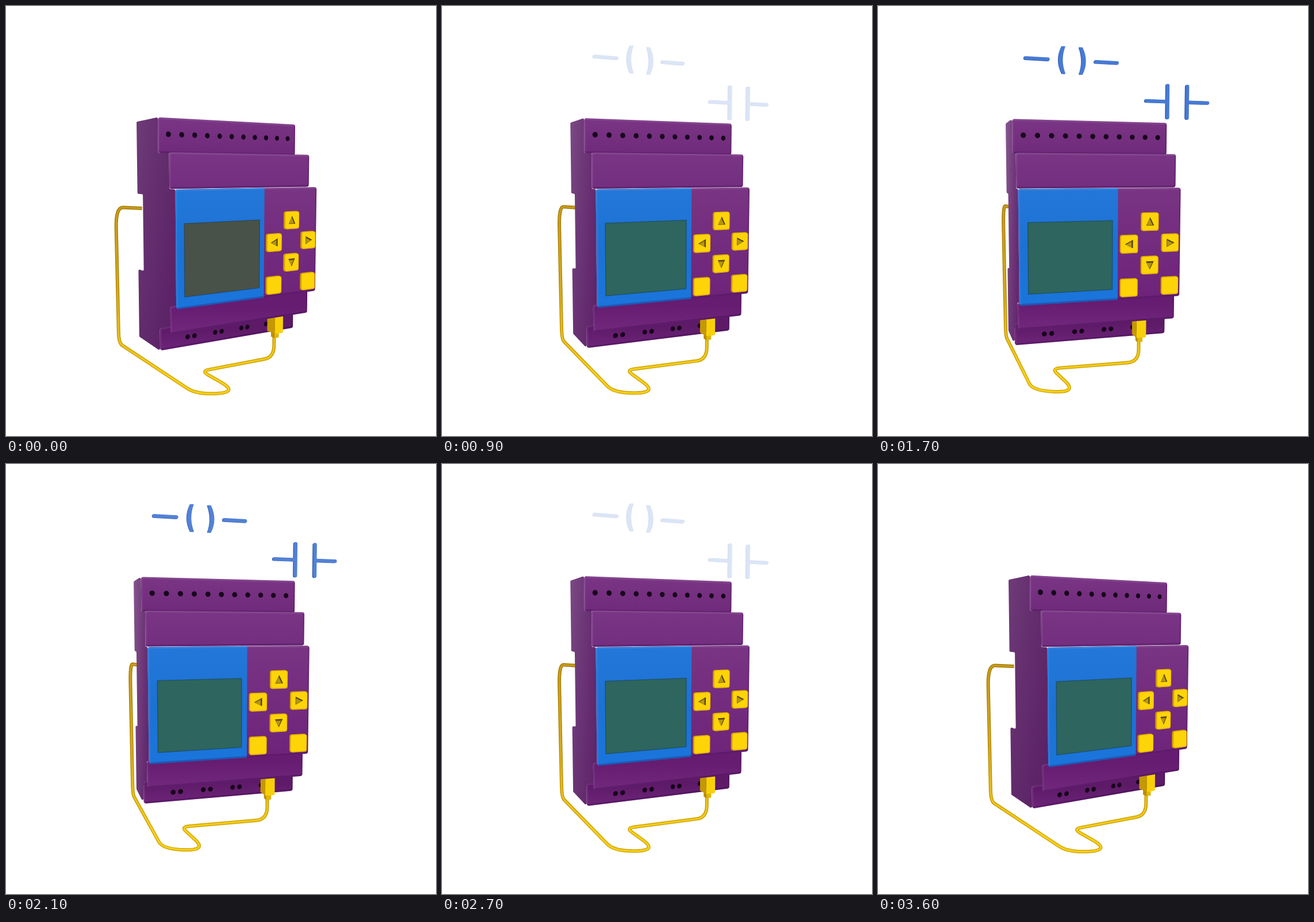
Recreate the animation shown at these times as an HTML page with a canvas. Size 748 px wide and 748 px high, loop 3700 ms.

```html
<!DOCTYPE html>
<html lang="en">
<head>
<meta charset="utf-8">
<title>Controller</title>
<style>
html, body { margin: 0; width: 100%; height: 100%; overflow: hidden; background: #fff; }
canvas { display: block; }
</style>
</head>
<body>
<canvas id="stage" width="748" height="748"></canvas>
<script>
const g = document.getElementById('stage').getContext('2d');
const LOOP = 3700, HALF = 1800, STEP = 100;

// camera: focal length in px, looking slightly down; pivot of the device
const FOCAL = 972, CENTER = 374, PIVOT_X = -6.2, PIVOT_Z = 1126.3;
const TILT_COS = Math.cos(0.0874), TILT_SIN = Math.sin(0.0874);
const TURN_FROM = 30, TURN_BY = -14.8; // degrees

// device space: x along the front, y down, z towards the viewer
const LEFT = -164.8, RIGHT = 131.2, BACK = -19, FRONT = 148.5, SPLIT = 11.5;
const TIERS = {
  top: { z: 80, y0: -94, y1: -33, from: '#7a3685', to: '#702a7b' },
  upper: { z: 125, y0: -33, y1: 28.3, from: '#7a3685', to: '#732e7f' },
  main: { z: FRONT, y0: 28.3, y1: 228.3, from: '#793483', to: '#6d2279' },
  lower: { z: 125, y0: 228.3, y1: 276.5, from: '#661c71', to: '#71287d' },
  base: { z: 80, y0: 276.5, y1: 318, from: '#5d1a67', to: '#6e2479' }
};
// corners of the cable: x, y, z, rounding
const CABLE = [
  [-156, 69, -19, 0], [-156, 75, -168, 45], [-154, 373, -168, 22], [-150, 362, 194, 36],
  [-77, 369, 203, 38], [-104, 353, 123, 16], [70, 364, 100, 24], [70, 316, 100, 0]
];

let cos = 1, sin = 0, turn = 0;

function aim(u) {
  turn = u;
  const a = (TURN_FROM + TURN_BY * u) * Math.PI / 180;
  cos = Math.cos(a);
  sin = Math.sin(a);
}

function project([x, y, z]) {
  const depth = PIVOT_Z + x * sin - z * cos;
  const u = (PIVOT_X + x * cos + z * sin) / depth, v = y / depth;
  const w = TILT_COS + v * TILT_SIN;
  return [CENTER + FOCAL * u / w, CENTER + FOCAL * (v * TILT_COS - TILT_SIN) / w];
}

const rect = (x0, y0, x1, y1, z) => [[x0, y0, z], [x1, y0, z], [x1, y1, z], [x0, y1, z]];
const smooth = u => { u = Math.min(1, Math.max(0, u)); return u * u * (3 - 2 * u); };
const mix = (c, d, u) => `rgb(${c.map((v, i) => Math.round(v + (d[i] - v) * u))})`;

function ramp(x0, y0, x1, y1, ...colors) {
  const r = g.createLinearGradient(x0, y0, x1, y1);
  colors.forEach((c, i) => r.addColorStop(i / (colors.length - 1), c));
  return r;
}

function path(pts, r = 0) {
  const p = pts.map(project), n = p.length, a = p[n - 1], b = p[0];
  g.beginPath();
  g.moveTo((a[0] + b[0]) / 2, (a[1] + b[1]) / 2);
  p.forEach((q, i) => g.arcTo(...q, ...p[(i + 1) % n], r));
  g.closePath();
}

function fill(pts, color, r) {
  path(pts, r);
  g.fillStyle = color;
  g.fill();
}

function line(pts, color, width, cap = 'butt') {
  g.beginPath();
  pts.forEach(p => g.lineTo(...project(p)));
  g.strokeStyle = color;
  g.lineWidth = width;
  g.lineCap = cap;
  g.stroke();
}

function hole(x, y, z, r) {
  const ring = Array.from({ length: 16 }, (_, i) =>
    [x + r * Math.cos(i * Math.PI / 8), y + r * Math.sin(i * Math.PI / 8), z]);
  fill(ring, '#17051b');
}

function side() {
  const steps = Object.values(TIERS).flatMap(t => [[t.z, t.y0], [t.z, t.y1]]);
  const back = [[BACK, 318], [BACK, 185.5], [8, 185.5], [8, 41], [BACK, 41], [BACK, -94]];
  const pts = [...steps, ...back].map(([z, y]) => [LEFT, y, z]);
  const x0 = project([LEFT, 0, BACK])[0], x1 = project([LEFT, 0, FRONT])[0];
  const near = mix([110, 58, 119], [134, 86, 143], turn);
  const far = mix([97, 42, 107], [106, 48, 116], turn);
  fill(pts, ramp(x0, 0, x1, 0, near, far), 2);
  fill(pts, ramp(0, 200, 0, 590, 'rgba(70,10,85,0)', 'rgba(70,10,85,.3)'), 2);
}

// front of one tier with bevelled edges
function face({ z, y0, y1, from, to }, inside) {
  const p = rect(LEFT, y0, RIGHT, y1, z);
  const top = project(p[0])[1], bottom = project(p[3])[1];
  g.save();
  path(p, 4);
  g.fillStyle = ramp(0, top, 0, bottom, from, to);
  g.fill();
  g.clip();
  if (inside) inside(top, bottom);
  line([p[1], p[2]], 'rgba(40,0,50,.2)', 4);
  line([p[3], p[2]], 'rgba(40,0,60,.25)', 6);
  line([p[3], p[0]], 'rgba(255,255,255,.06)', 6);
  line([p[0], p[1]], 'rgba(255,255,255,.08)', 6);
  g.restore();
}

function cable() {
  const towards = (a, b, d) => {
    const len = Math.hypot(b[0] - a[0], b[1] - a[1], b[2] - a[2]);
    return [0, 1, 2].map(i => a[i] + (b[i] - a[i]) * d / len);
  };
  const last = CABLE.length - 1;
  g.beginPath();
  g.moveTo(...project(CABLE[0]));
  for (let i = 1; i < last; i++) {
    const c = CABLE[i], r = c[3];
    g.lineTo(...project(towards(c, CABLE[i - 1], r)));
    g.quadraticCurveTo(...project(c), ...project(towards(c, CABLE[i + 1], r)));
  }
  g.lineTo(...project(CABLE[last]));
  g.lineCap = 'butt';
  g.lineJoin = 'round';
  g.lineWidth = 6;
  g.strokeStyle = ramp(0, 350, 0, 640, '#a67c0a', '#b38a0e', '#d3a608');
  g.stroke();
  g.lineWidth = 3;
  g.strokeStyle = ramp(0, 350, 0, 640, '#c99d18', '#d6ab1c', '#f8d218');
  g.stroke();
}

function block(x0, x1, y0, y1, z0, z1, front, flank) {
  fill([[x0, y0, z0], [x0, y0, z1], [x0, y1, z1], [x0, y1, z0]], flank);
  fill(rect(x0, y0, x1, y1, z1), front, 1);
}

function button(x, y, quarter) {
  const h = 16.5, z = FRONT + 4;
  fill(rect(x - h, y - h, x + h, y + h + 0.5, FRONT), '#c89402', 4);
  fill(rect(x - h, y - h, x + h, y + h, z), '#e9b904', 4);
  fill(rect(x - h + 1.5, y - h + 1.5, x + h - 1.5, y + h - 2, z), '#fdd408', 3);
  if (quarter === undefined) return;
  const c = Math.cos(quarter * Math.PI / 2), s = Math.sin(quarter * Math.PI / 2);
  const arrow = (k, dx, dy) => [[-7.5, 7], [7.5, 7], [0, -8]].map(([a, b]) =>
    [x + dx + k * (a * c - b * s), y + dy + k * (a * s + b * c), z]);
  fill(arrow(1, 0, 0), '#54420a');
  fill(arrow(0.75, -1, 1), '#b59610');
}

function buttons() {
  const x = 71, y = 128, gap = 39.4;
  for (let k = 0; k < 4; k++) {
    const a = k * Math.PI / 2;
    button(x + gap * Math.sin(a), y - gap * Math.cos(a), k);
  }
  for (const d of [-1, 1]) button(x + d * gap, y + 2 * gap);
}

function symbols(alpha) {
  if (alpha <= 0) return;
  const white = [255, 255, 255];
  const layer = (z, color) => {
    const bar = (x0, y0, x1, y1) => line([[x0, y0, z], [x1, y1, z]], color, 6, 'round');
    for (const d of [-1, 1]) {
      // coil: bar and bracket on each side
      const coil = -47, y = -208;
      bar(coil + d * 46, y, coil + d * 88, y);
      const at = (x, dy) => project([coil + d * x, y + dy, z]);
      g.beginPath();
      g.moveTo(...at(13, -25));
      g.lineTo(...at(20, -25));
      g.quadraticCurveTo(...at(33, 0), ...at(20, 25));
      g.lineTo(...at(13, 25));
      g.quadraticCurveTo(...at(23, 0), ...at(13, -25));
      g.fillStyle = color;
      g.fill();
      // contact: plate and lead on each side
      const mid = 167, row = -138.5;
      bar(mid + d * 21, row - 31, mid + d * 21, row + 31);
      bar(mid + d * 22, row, mid + d * 65.5, row);
    }
  };
  layer(44, mix(white, [48, 92, 176], alpha));
  layer(48, mix(white, [72, 122, 212], alpha));
}

function draw(t) {
  aim((1 - Math.cos(Math.PI * t / HALF)) / 2);
  g.fillStyle = '#fff';
  g.fillRect(0, 0, 748, 748);

  cable();
  side();
  face(TIERS.top);
  for (let k = 0; k < 11; k++) hole(-145 + 25.8 * k, -65.7, 80, 4.8);
  face(TIERS.base);
  for (let k = 0; k < 8; k++) hole(-109.6 + 58 * (k >> 1) + 14 * (k & 1), 301, 80, 4.7);
  block(64, 74, 305, 322, 98, 110, '#e3b506', '#b98e04');
  block(59, 78, 260, 311, 92, 118, '#f8d008', '#c49803');
  face(TIERS.lower);
  face(TIERS.upper);
  face(TIERS.main, (top, bottom) => {
    fill(rect(LEFT, 20, SPLIT, 240, FRONT), ramp(0, top, 0, bottom, '#2377d9', '#1c72d4', '#1a75dc'));
  });

  const glass = rect(-149, 85.3, 1.5, 209, FRONT);
  fill(glass, mix([73, 82, 72], [46, 101, 94], Math.min(1, t / 200)));
  path(glass);
  g.strokeStyle = 'rgba(15,30,30,.3)';
  g.lineWidth = 1.5;
  g.stroke();

  buttons();
  const near = t <= HALF ? t : 2 * HALF - t;
  symbols(smooth((near - 600) / 1050));
}

const start = performance.now();
function tick() {
  const t = (performance.now() - start) % LOOP;
  draw(Math.floor(t / STEP) * STEP);
  requestAnimationFrame(tick);
}
tick();
</script>
</body>
</html>
```
